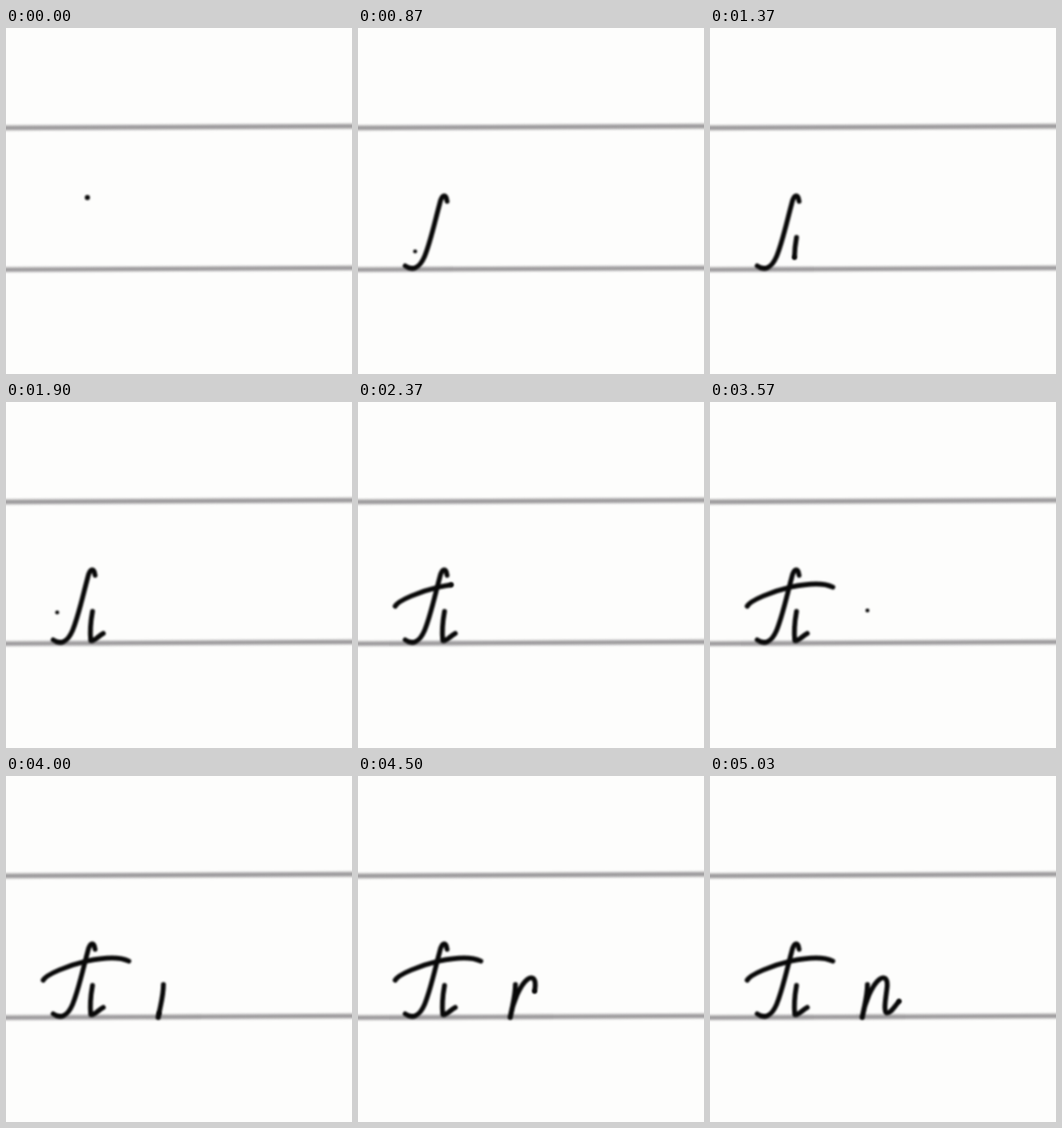
These frames come from a looping animation (400 px wide and 400 px high, 5.09 s). An HTML page:

```html
<!DOCTYPE html>
<html lang="en">
<head>
<meta charset="utf-8">
<title>Handwriting</title>
<style>
  html, body { margin: 0; width: 100%; height: 100%; overflow: hidden; background: #fdfdfc; }
  svg { display: block; width: 100vw; height: 100vh; }
  path { fill: none; stroke-linecap: round; stroke-linejoin: round; }
</style>
</head>
<body>
<svg viewBox="0 0 400 400">
  <defs>
    <filter id="soft" filterUnits="userSpaceOnUse" x="-20" y="-20" width="440" height="440" color-interpolation-filters="sRGB">
      <feGaussianBlur stdDeviation="1"/>
    </filter>
    <filter id="softer" filterUnits="userSpaceOnUse" x="-20" y="-20" width="440" height="440" color-interpolation-filters="sRGB">
      <feGaussianBlur stdDeviation="1.4"/>
    </filter>
  </defs>
  <path d="M-10 115.6L410 113.4M-10 279.4L410 277.4" stroke="#9c9a9c" stroke-width="5.4" filter="url(#softer)"/>
  <g id="ink" filter="url(#soft)"></g>
  <circle id="pen" fill="#080808" filter="url(#soft)"/>
</svg>
<script>
const LOOP = 5090;
const ink = document.getElementById('ink');
const pen = document.getElementById('pen');

// Each move: start ms, end ms, path, and whether the pen touches the paper.
const moves = [
  [0, 100, 'M94 196L103 200.5'],
  [100, 740, 'M103 200.5C102 192 97 191 94.5 203C89 223 84 247 77 264C71 278 63 281 54.5 275', true],
  [740, 1100, 'M54.5 275C57 268 60 263 65 259S90 244 100 242'],
  [1130, 1660, 'M100 242C98 253 97 266 98 276C102 277 106 271 112.5 267.5', true],
  [1690, 1970, 'M112.5 267.5C95 260 68 247 43 236'],
  [1970, 2580, 'M43 236C47 229 72 219 93 214C112 210 130 208 142 214', true],
  [2600, 2870, 'M142 214C151 228 158 244 168 253'],
  [2870, 3570, 'M168 253C173 250 178 245 182 241'],
  [3590, 3900, 'M182 241C182 255 178 267 176 279', true],
  [3960, 4860, 'M176 279C179 262 187 242 196 235C203 230 206 236 204.5 246C203 258 200 274 205 274C209 274 213 267 218.5 260.5', true]
].map(([start, end, d, draws]) => {
  const path = document.createElementNS('http://www.w3.org/2000/svg', 'path');
  path.setAttribute('d', d);
  path.setAttribute('stroke', draws ? '#080808' : 'none');
  path.setAttribute('stroke-width', 5.6);
  ink.append(path);
  return { start, end, draws, path, length: path.getTotalLength() };
});

const ease = p => p + 0.15 * (p * p * (3 - 2 * p) - p);

function render(time) {
  let current = moves[0];
  for (const move of moves) {
    const started = time >= move.start;
    const p = Math.min(1, Math.max(0, (time - move.start) / (move.end - move.start)));
    move.reach = move.length * ease(p);
    if (started) current = move;
    if (move.draws) {
      move.path.style.visibility = started ? 'visible' : 'hidden';
      move.path.style.strokeDasharray = p < 1 ? `${move.reach} ${move.length + 20}` : 'none';
    }
  }
  const tip = current.path.getPointAtLength(current.reach);
  pen.setAttribute('cx', tip.x);
  pen.setAttribute('cy', tip.y);
  pen.setAttribute('r', time < 100 ? 3 : 2.3);
}

function tick() {
  render(performance.now() % LOOP);
  requestAnimationFrame(tick);
}
tick();
</script>
</body>
</html>
```
